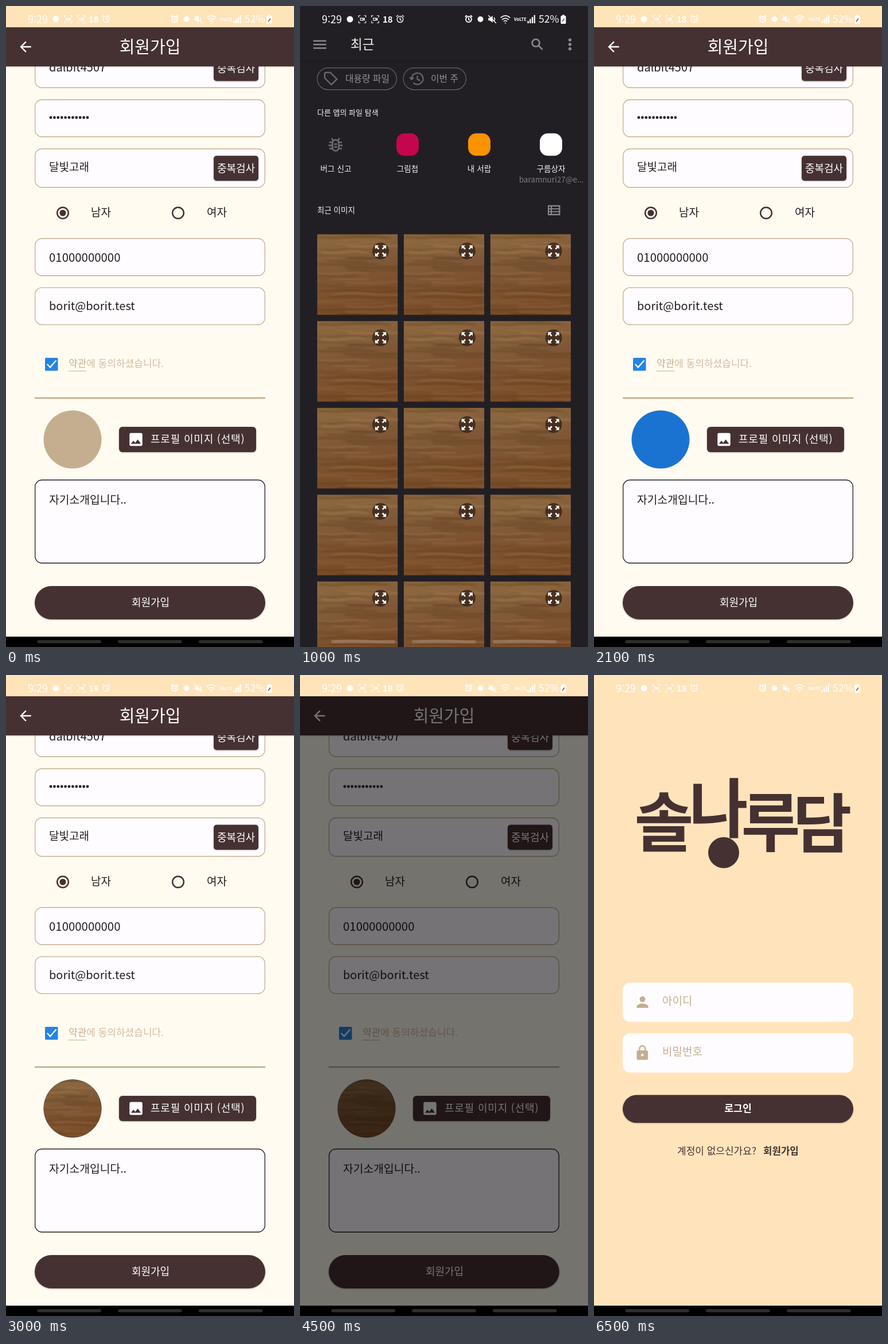
An HTML page for the animation above (6600 ms loop, 502 by 1115 pixels).

```html
<!DOCTYPE html>
<html lang="ko">
<head>
<meta charset="utf-8">
<title>회원가입</title>
<style>
html, body { margin: 0; width: 100%; height: 100%; overflow: hidden; background: #000; }
svg { display: block; }
text { font-family: "Noto Sans CJK KR", "Noto Sans KR", "Noto Sans", sans-serif; white-space: pre; }
#form, #login { font-weight: 500; }
.raised { filter: drop-shadow(0 1.5px 1.2px #0004); }
</style>
</head>
<body>
<svg id="stage" width="502" height="1115" viewBox="0 0 502 1115"></svg>
<script>
const BROWN = '#463132', TAN = '#c4ae8f', PEACH = '#ffe3b9', PAPER = '#fffcff', INK = '#221c1c', GREY = '#8a888c';
const LOOP = 6600, STEP = 100;

// Drawing helpers; text and icons are placed by their vertical centre.
const text = (x, y, size, str, fill, more = '') =>
  `<text x="${x}" y="${y + size * .37}" font-size="${size}" fill="${fill}" ${more}>${str}</text>`;
const middle = 'text-anchor="middle" ';
const rect = (x, y, w, h, r, fill, more = '') =>
  `<rect x="${x}" y="${y}" width="${w}" height="${h}" rx="${r}" fill="${fill}" ${more}/>`;
const circle = (x, y, r, fill, more = '') => `<circle cx="${x}" cy="${y}" r="${r}" fill="${fill}" ${more}/>`;
const place = (x, y, size) => `transform="translate(${x - size / 2} ${y - size / 2}) scale(${size / 24})"`;
const solid = (x, y, size, d, fill) => `<path d="${d}" fill="${fill}" ${place(x, y, size)}/>`;
const line = (x, y, size, d, color, width = 2) =>
  `<path d="${d}" fill="none" stroke="${color}" stroke-width="${width}" ${place(x, y, size)}/>`;
const times = (n, f) => Array.from({ length: n }, (_, i) => f(i)).join('');

const ALARM = 'M12 5a8 8 0 1 0 .01 0M12 8v6l4 2M2 6l5-4M22 6l-5-4';
const VIEWFINDER = 'M2 7V2h5M17 2h5v5M22 17v5h-5M7 22H2v-5M7 9h7v6H7zM14 12l4-3v6z';

function field(y, h, stroke = TAN) {
  return rect(50.7, y, 400.6, h, 12, PAPER, `stroke="${stroke}" stroke-width="1.3"`);
}
function checkButton(y) {
  return rect(362, y, 78, 43.5, 5, BROWN, 'class="raised"') + text(401, y + 21.5, 18, '중복검사', '#fff', middle);
}

function woodSymbol() {
  let seed = 7;
  const rnd = () => (seed = seed * 16807 % 2147483647) / 2147483647;
  const streaks = times(28, i => {
    const y = i * 5.2, x = rnd() * 90 - 30, len = 50 + rnd() * 100, bend = rnd() * 8 - 4;
    const color = rnd() < .55 ? '#3d2412' : '#b08a60';
    return `<path d="M${x} ${y}q${len / 4} ${bend} ${len / 2} 0t${len / 2} ${bend / 2}" fill="none"
      stroke="${color}" stroke-width="${2 + rnd() * 3}" opacity="${.1 + rnd() * .2}"/>`;
  });
  return `<defs>
    <linearGradient id="grain" x2=".25" y2="1">
      <stop stop-color="#8e6a40"/><stop offset=".5" stop-color="#805837"/><stop offset="1" stop-color="#774a25"/>
    </linearGradient>
    <filter id="soft"><feGaussianBlur stdDeviation="3 1.1"/></filter>
    <clipPath id="round"><circle cx="116" cy="754" r="50.5"/></clipPath>
    <symbol id="wood" viewBox="0 0 140 140">${rect(0, 0, 140, 140, 0, 'url(#grain)')}<g filter="url(#soft)">${streaks}</g></symbol>
  </defs>`;
}

function formPage() {
  return rect(0, 0, 502, 1097, 0, '#fffbf0')
    + field(75, 67) + text(75, 107, 20, 'dalbit4507', INK) + checkButton(87)
    + field(163, 64.5) + times(11, i => circle(78 + i * 6.4, 194, 2.4, INK))
    + field(248.5, 67) + text(75, 280, 19, '달빛고래', INK) + checkButton(260.5)
    + circle(99, 360, 9.8, 'none', `stroke="${BROWN}" stroke-width="2.5"`) + circle(99, 360, 5.6, BROWN)
    + text(148, 359, 19, '남자', INK)
    + circle(300, 360, 9.8, 'none', `stroke="${BROWN}" stroke-width="2.5"`) + text(350, 359, 19, '여자', INK)
    + field(404.5, 64.5) + text(75, 437, 20.4, '01000000000', INK)
    + field(489.8, 64.5) + text(75, 522, 20, 'borit@borit.test', INK)
    + rect(68, 612, 22.5, 22.5, 1.5, '#2484e2') + line(79.2, 623, 22, 'M4 12l5.5 6L21 5', '#fff', 2.6)
    + text(109, 622, 17, `<tspan fill="${TAN}">약관</tspan>에 동의하셨습니다.`, '#d3bba3')
    + rect(109, 634.5, 31, 1, 0, TAN) + rect(50, 680.7, 402, 2.5, 0, '#c4a88a')
    + circle(116, 754, 50.5, TAN, 'id="avatar"')
    + '<g id="photo" clip-path="url(#round)"><use href="#wood" x="65" y="703" width="102" height="102"/></g>'
    + rect(197, 732, 239, 44, 6, BROWN, 'class="raised"') + rect(197, 732, 239, 44, 6, '#fff', 'id="pickPress"')
    + solid(226.5, 754, 30, 'M21 19V5c0-1.1-.9-2-2-2H5c-1.1 0-2 .9-2 2v14c0 1.1.9 2 2 2h14c1.1 0 2-.9 2-2zM8.5 13.5l2.5 3L14.5 12l4.5 6H5z', '#fff')
    + text(252, 753, 18, '프로필 이미지 (선택)', '#fff', 'letter-spacing=".8"')
    + field(824.5, 144.5, INK) + text(75, 859, 19.3, '자기소개입니다..', INK)
    + rect(212, 849, 2.6, 24, 0, BROWN, 'id="caret"')
    + rect(50, 1009, 402, 58, 29, BROWN, 'class="raised"') + rect(50, 1009, 402, 58, 29, '#fff', 'id="sendPress"')
    + text(252, 1037.5, 18, '회원가입', '#fff', middle)
    + rect(0, 37, 502, 68, 0, BROWN, 'class="raised"') + rect(0, 0, 502, 37, 0, PEACH)
    + solid(34, 71, 29, 'M20 11H7.8l5.6-5.6L12 4l-8 8 8 8 1.4-1.4L7.8 13H20z', '#fff')
    + text(251, 71, 29, '회원가입', '#fff', middle)
    + rect(0, 1097, 502, 64, 0, '#000');
}

function thumb(i) {
  const x = 30 + i % 3 * 150.8, y = 397 + Math.floor(i / 3) * 151;
  const arrow = 'M2 2h7L6.5 4.5 10 8 8 10 4.5 6.5 2 9z';
  return `<use href="#wood" x="${x}" y="${y}" width="140.5" height="140.5"/>`
    + circle(x + 110.5, y + 29, 14.6, '#2c1d14', 'opacity=".7"')
    + times(4, k => `<path d="${arrow}" fill="#fff" transform="translate(${x + 110.5} ${y + 29}) rotate(${k * 90}) scale(.92) translate(-12.5 -12.5)"/>`);
}

function pickerPage() {
  const bold = 'font-weight="500"';
  const app = (x, color, label) => rect(x - 19.5, 221.5, 39, 39, 14, color) + text(x, 283, 13.6, label, '#f2f2f2', middle + bold);
  const chip = (x, w) => rect(x, 107.5, w, 38, 19, 'none', 'stroke="#68666a" stroke-width="1.2"');
  return rect(0, 0, 502, 1115, 0, '#211f24')
    + solid(34.5, 67, 30, 'M3 18h18v-2H3zm0-5h18v-2H3zm0-7v2h18V6z', GREY)
    + text(88, 67, 22.5, '최근', '#f2f2f2')
    + line(414, 67, 28, 'M9.5 4a5.5 5.5 0 1 0 .01 0M13.5 13.5l6 6', GREY, 2.2)
    + times(3, i => circle(470.5, 59 + i * 7.7, 2.7, GREY))
    + rect(0, 95.5, 502, 1.2, 0, '#19171b')
    + chip(30, 138.5) + line(54, 126.5, 29, 'M3 4v7l9.5 9.5 8-8L11 3H4zM7 7h.5', '#68666a', 2.1)
    + text(79, 126, 15.8, '대용량 파일', '#929094')
    + chip(180, 109.5) + line(204, 126.5, 28, 'M4 12a8.5 8.5 0 1 1 2.5 6M1 10l3 3 3-3M12.5 7.5v5l4 2.5', '#68666a', 2)
    + text(228, 126, 15.8, '이번 주', '#929094')
    + text(30, 185, 13, '다른 앱의 파일 탐색', '#f2f2f2', bold)
    + line(62, 241, 33, 'M8 10v6a4 4 0 0 0 8 0v-6a4 4 0 0 0-8 0M9 7L7 4M15 7l2-3M4 9h4M3 13h5M4 17h4M16 9h4M16 13h5M16 17h4M10 11.5h4M10 15h4', '#706e72', 1.8)
    + text(62.5, 283, 13.6, '버그 신고', '#f2f2f2', middle + bold)
    + app(187.5, '#c4064f', '그림첩') + app(312.5, '#f99300', '내 서랍') + app(437.5, '#fff', '구름상자')
    + text(438, 302, 13.5, 'baramnuri27@e...', '#7d7b80', middle)
    + text(30, 355, 13.5, '최근 이미지', '#f2f2f2', bold)
    + rect(432, 346.5, 21.5, 17.5, 1, GREY)
    + times(3, i => rect(434, 348.8 + i * 4.9, 3, 3, 0, '#211f24') + rect(439, 348.8 + i * 4.9, 12.3, 3, 0, '#211f24'))
    + times(15, thumb);
}

function loginPage() {
  const bold = 'font-weight="700"';
  const box = y => rect(50, y, 402, 68.5, 13, PAPER);
  return rect(0, 0, 502, 1097, 0, '#ffe4bb')
    + `<text x="122 217 308 398" y="298 274 298 300" font-size="112" fill="${BROWN}" ${middle + bold}>솔나루담</text>`
    + circle(226, 309, 27, BROWN)
    + box(535) + solid(84.5, 569, 30, 'M12 12a4 4 0 1 0 0-8 4 4 0 0 0 0 8zm0 2c-2.7 0-8 1.3-8 4v2h16v-2c0-2.7-5.3-4-8-4z', TAN)
    + text(119, 567, 19, '아이디', TAN)
    + box(623) + rect(74.5, 653, 19.5, 16.5, 2.5, TAN) + circle(84.3, 661, 2.3, PAPER)
    + line(84.3, 657, 29, 'M8 9V6a4 4 0 0 1 8 0v3', TAN) + text(119, 655, 19, '비밀번호', TAN)
    + rect(50, 730.5, 402, 48.5, 24.2, BROWN, 'class="raised"')
    + text(251, 754, 17.2, '로그인', '#fff', middle + bold)
    + text(145, 828, 17, '계정이 없으신가요?', BROWN)
    + text(295, 828, 16.8, '회원가입', BROWN, bold);
}

function statusIcons() {
  return text(38, 23, 18, '9:29', '#fff') + circle(87, 23, 5.5, '#fff')
    + line(108.5, 23, 15, VIEWFINDER, '#fff', 1.8) + line(131, 23, 15, VIEWFINDER, '#fff', 1.8)
    + text(144, 23, 15, '18', '#fff', 'font-weight="700"') + line(174.5, 22.5, 16, ALARM, '#fff')
    + line(294, 22.5, 15, ALARM, '#fff', 3) + circle(314.5, 23, 5, '#fff')
    + solid(335, 23, 18, 'M3 9v6h4l6 5V4L7 9z', '#fff') + line(335, 23, 18, 'M3 3l18 18M16 8q4 4 0 8', '#fff')
    + line(358, 23, 20, 'M2 9q10-9 20 0M5 13q7-6 14 0M8.5 16.5q3.5-3 7 0M11 20h2', '#fff', 2)
    + text(373, 23.5, 7.5, 'VoLTE', '#fff', 'font-weight="700"')
    + times(4, i => rect(396.5 + i * 3.7, 26 - i * 3.4, 2.3, 4 + i * 3.4, 0, '#fff'))
    + text(416, 23, 17.5, '52%', '#fff')
    + rect(454.5, 17, 9, 14, 1.5, '#fff') + rect(457, 15.5, 4, 2, 0, '#fff')
    + '<path d="M457 27l4-5" stroke="#555" stroke-width="1.5"/>';
}

const $ = id => document.getElementById(id);
$('stage').innerHTML = woodSymbol()
  + `<g id="form">${formPage()}</g>` + rect(0, 37, 502, 1060, 0, '#000', 'id="dim"')
  + `<g id="picker">${pickerPage()}</g>`
  + `<svg y="37" width="502" height="1060" viewBox="0 37 502 1060"><g id="login">${loginPage()}</g></svg>`
  + times(3, i => rect(54.5 + i * 140.7, 1103, 111.5, 5.5, 2.7, '#fff', 'opacity=".18"'))
  + statusIcons();

const clamp = v => Math.max(0, Math.min(1, v));
const ramp = (t, from, to) => clamp((t - from) / (to - from));
const pulse = (t, a, b, c, d) => ramp(t, a, b) * (1 - ramp(t, c, d));
const cubic = (a, b, c, d, s) => a * (1 - s) ** 3 + 3 * b * s * (1 - s) ** 2 + 3 * c * s * s * (1 - s) + d * s ** 3;

// Fast start, very long settling: two joined Bezier curves.
function settle(x) {
  const first = x < 1 / 6;
  const xs = first ? [0, .05, .1333, 1 / 6] : [1 / 6, .2083, .25, 1];
  const ys = first ? [0, 0, .06, .4] : [.4, .82, 1, 1];
  let lo = 0, hi = 1;
  for (let i = 0; i < 24; i++) {
    const s = (lo + hi) / 2;
    if (cubic(...xs, s) < x) lo = s; else hi = s;
  }
  return cubic(...ys, hi);
}

const show = (id, value) => $(id).setAttribute('opacity', value);
const OPEN = 609, CLOSE = 1626, SLIDE = 425, SHIFT = 1115 * .041;

function draw(t) {
  const open = settle(ramp(t, OPEN, OPEN + SLIDE)) - settle(ramp(t, CLOSE, CLOSE + SLIDE));
  $('form').setAttribute('transform', `translate(0 ${-SHIFT * open})`);
  show('form', t > OPEN && t < CLOSE ? .9 : 1);
  $('picker').setAttribute('transform', `translate(0 ${SHIFT * (1 - open)})`);
  show('picker', pulse(t, OPEN, OPEN + 60, CLOSE + 80, CLOSE + 140));

  $('avatar').setAttribute('fill', t < 1800 ? TAN : '#1a73d1');
  show('photo', t >= 2300 ? 1 : 0);
  show('caret', t >= 2500 && t < 4100 && t % 1000 >= 500 ? 1 : 0);
  show('pickPress', .14 * pulse(t, 50, 250, 450, 650));
  show('sendPress', .14 * pulse(t, 3450, 3650, 3750, 3950));

  const enter = ramp(t, 5303, 5603);
  show('dim', .54 * ramp(t, 4050, 4250) + .25 * clamp(enter / .3));
  const scale = .85 + .15 * settle(enter);
  $('login').setAttribute('transform', `translate(251 548.5) scale(${scale}) translate(-251 -548.5)`);
  show('login', ramp(enter, .125, .25));
}

const start = performance.now();
function tick() {
  const t = (performance.now() - start) % LOOP;
  draw(Math.floor(t / STEP) * STEP);
  requestAnimationFrame(tick);
}
tick();
</script>
</body>
</html>
```
